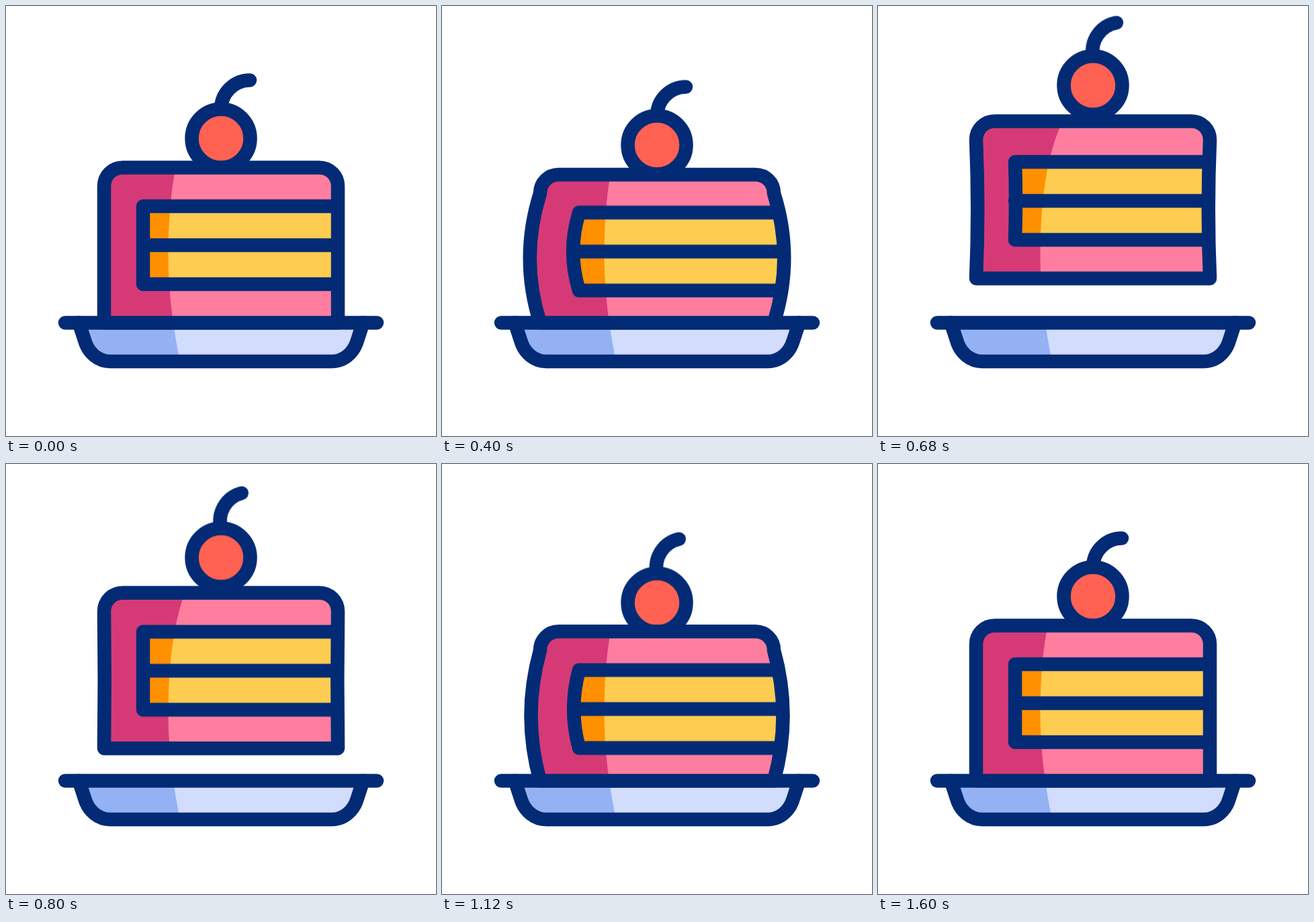
Recreate the animation shown at these times as an HTML page without scripts. Size 640x640 px, loop 1.84 s.

```html
<!DOCTYPE html>
<html lang="en">
<head>
<meta charset="utf-8">
<title>Jumping cake</title>
<style>
  html, body { margin: 0; height: 100%; overflow: hidden; background: #fff; }
  svg { display: block; width: 100%; height: 100%; }

  :root {
    --launch: cubic-bezier(.4, 0, .8, .6);
    --rise: cubic-bezier(.33, .4, .67, .76);
    --slow: cubic-bezier(.33, .67, .67, 1);
    --drop: cubic-bezier(.33, 0, .67, .33);
    --fall: cubic-bezier(.33, .22, .67, .56);
  }

  .line { fill: none; stroke: #032b75; stroke-width: 20.5; stroke-linecap: round; stroke-linejoin: round; }
  .body, .layers, .cherry, .stem { animation: 1840ms ease-in-out infinite; }
  .body { animation-name: body; }
  .layers { animation-name: layers; }
  .cherry { animation-name: cherry; }
  .stem { animation-name: stem; transform-origin: 320px 154px; }

  @keyframes body {
    0%, 6.52%, 86.96%, 100% {
      d: path("M146 471.5c0 -68 0 -135 0 -203c0 -16 12 -28 28 -28h292c16 0 28 12 28 28c0 68 0 135 0 203z");
    }
    21.74% {
      d: path("M146 471.5c-20.5 -64 -20.5 -128 0 -192.5c0 -16 12 -28 28 -28h292c16 0 28 12 28 28c20.5 64 20.5 128 0 192.5z");
      animation-timing-function: var(--launch);
    }
    26.09% {
      d: path("M146 471.5c8 -71 8 -142 0 -213c0 -16 12 -28 28 -28h292c16 0 28 12 28 28c-8 71 -8 142 0 213z");
      animation-timing-function: var(--rise);
    }
    30.43% {
      d: path("M146 428c7 -70 7 -141 0 -211c0 -16 12 -28 28 -28h292c16 0 28 12 28 28c-7 70 -7 141 0 211z");
      animation-timing-function: var(--slow);
    }
    36.96% {
      d: path("M146 405.5c3 -69 3 -137 0 -206c0 -16 12 -28 28 -28h292c16 0 28 12 28 28c-3 69 -3 137 0 206z");
      animation-timing-function: var(--drop);
    }
    43.48% {
      d: path("M146 423c1 -68 1 -135 0 -203.5c0 -16 12 -28 28 -28h292c16 0 28 12 28 28c-1 68 -1 135 0 203.5z");
      animation-timing-function: var(--fall);
    }
    50% {
      d: path("M146 471.5c0 -68 0 -135 0 -203c0 -16 12 -28 28 -28h292c16 0 28 12 28 28c0 68 0 135 0 203z");
      animation-timing-function: linear;
    }
    52.17% {
      d: path("M146 471.5c-10 -66 -4 -133 0 -199.5c0 -16 12 -28 28 -28h292c16 0 28 12 28 28c4 66 10 133 0 199.5z");
      animation-timing-function: var(--slow);
    }
    58.7% {
      d: path("M146 471.5c-20.5 -64 -20.5 -128 0 -192.5c0 -16 12 -28 28 -28h292c16 0 28 12 28 28c20.5 64 20.5 128 0 192.5z");
    }
    69.57% {
      d: path("M146 471.5c8 -70 8 -141 0 -211.5c0 -16 12 -28 28 -28h292c16 0 28 12 28 28c-8 70 -8 141 0 211.5z");
    }
  }

  @keyframes layers {
    0%, 6.52%, 86.96%, 100% { transform: translateY(0); d: path("M520 298H204Q204 356 204 414H520M204 356H520"); }
    21.74% {
      transform: translateY(9.5px); d: path("M520 298H204Q186 356 204 414H520M204 356H520");
      animation-timing-function: var(--launch);
    }
    26.09% {
      transform: translateY(-1px); d: path("M520 298H204Q212 356 204 414H520M204 356H520");
      animation-timing-function: var(--rise);
    }
    30.43% {
      transform: translateY(-43px); d: path("M520 298H204Q211 356 204 414H520M204 356H520");
      animation-timing-function: var(--slow);
    }
    36.96% {
      transform: translateY(-66px); d: path("M520 298H204Q206 356 204 414H520M204 356H520");
      animation-timing-function: var(--drop);
    }
    43.48% {
      transform: translateY(-48.5px); d: path("M520 298H204Q204 356 204 414H520M204 356H520");
      animation-timing-function: var(--fall);
    }
    50% {
      transform: translateY(0); d: path("M520 298H204Q204 356 204 414H520M204 356H520");
      animation-timing-function: linear;
    }
    52.17% {
      transform: translateY(3px); d: path("M520 298H204Q197 356 204 414H520M204 356H520");
      animation-timing-function: var(--slow);
    }
    58.7% { transform: translateY(9.5px); d: path("M520 298H204Q186 356 204 414H520M204 356H520"); }
    69.57% { transform: translateY(0); d: path("M520 298H204Q212 356 204 414H520M204 356H520"); }
  }

  @keyframes cherry {
    0%, 6.52%, 86.96%, 100% { transform: translateY(0); }
    21.74% { transform: translateY(10px); animation-timing-function: var(--launch); }
    26.09% { transform: translateY(-13px); animation-timing-function: var(--rise); }
    30.43% { transform: translateY(-61px); animation-timing-function: var(--slow); }
    36.96% { transform: translateY(-79px); animation-timing-function: var(--drop); }
    43.48% { transform: translateY(-58px); animation-timing-function: var(--fall); }
    50% { transform: translateY(-3px); animation-timing-function: linear; }
    52.17% { transform: translateY(8px); animation-timing-function: var(--slow); }
    58.7% { transform: translateY(11px); }
    69.57% { transform: translateY(-8.5px); }
  }

  @keyframes stem {
    0%, 30.43%, 78.26%, 100% { transform: rotate(0deg); }
    41.3%, 54.35% { transform: rotate(-14.5deg); }
  }
</style>
</head>
<body>
<svg viewBox="0 0 640 640">
  <defs>
    <clipPath id="cake"><path class="body"/></clipPath>
    <clipPath id="shade">
      <path d="M0 0H278V165Q241.5 235 241.5 370Q241.5 440 257 519L262 540H0z"/>
    </clipPath>
    <path id="dish" d="M108.5 471.5L117.5 499C123 517 138 529 155 529H485C502 529 517 517 522.5 499L531.5 471.5"/>
  </defs>

  <use href="#dish" fill="#d2dcfd"/>
  <use href="#dish" fill="#94b1f4" clip-path="url(#shade)"/>
  <use href="#dish" class="line"/>
  <path class="line" d="M88 471.5H552"/>

  <g class="cherry">
    <path class="line stem" d="M320 154C320 130 339 110.5 363 110.5"/>
    <circle class="line" cx="320" cy="197" r="43.5" style="fill:#ff6152"/>
  </g>

  <g clip-path="url(#cake)">
    <rect width="640" height="640" fill="#ff7ea0"/>
    <path class="layers" fill="#fecc51"/>
    <g clip-path="url(#shade)">
      <rect width="640" height="640" fill="#d63a76"/>
      <path class="layers" fill="#ff9000"/>
    </g>
    <path class="line layers"/>
  </g>
  <path class="line body"/>
</svg>
</body>
</html>
```
